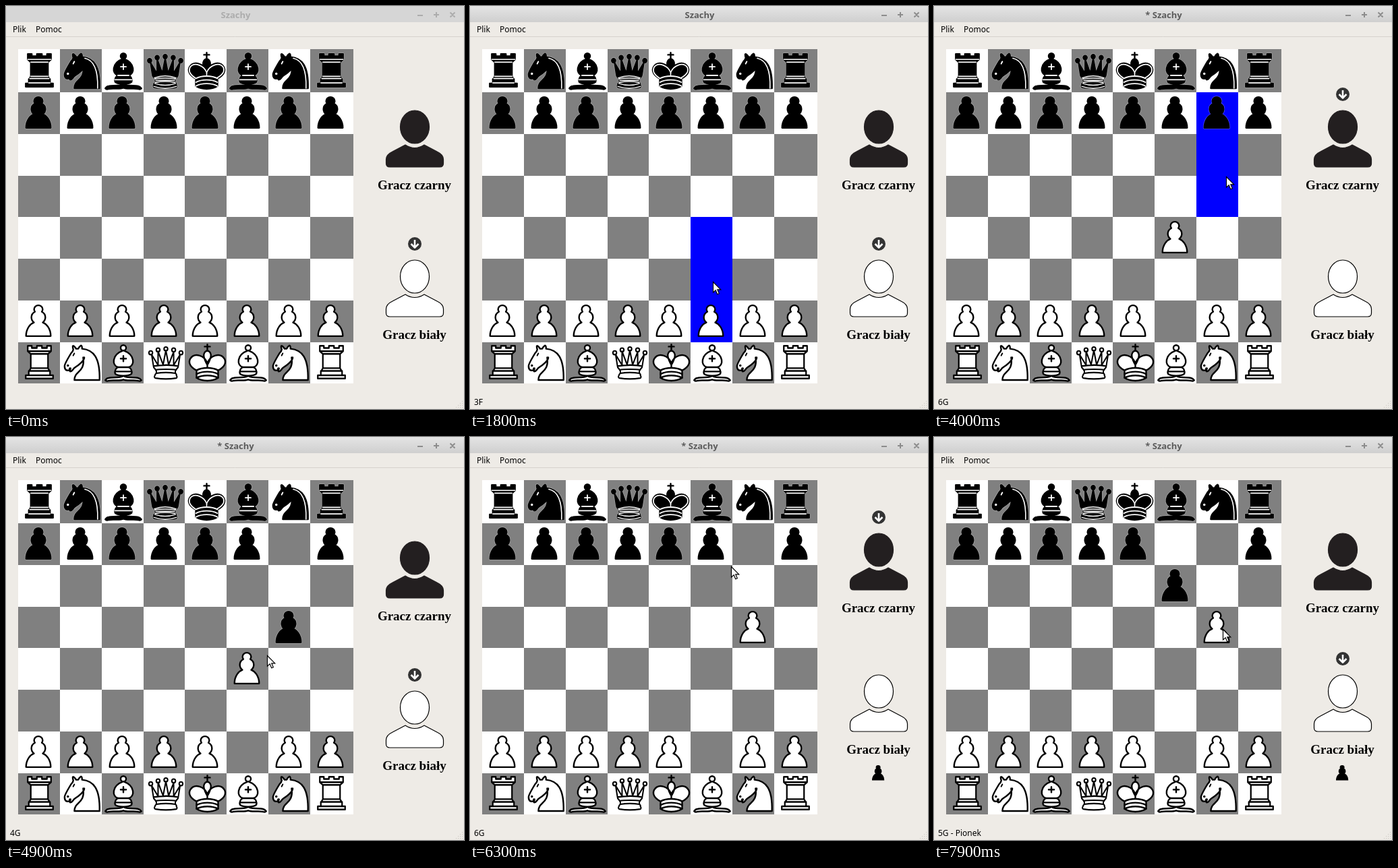
An HTML page with a canvas for the animation above (8000 ms loop, 679 px wide and 598 px high).

```html
<!DOCTYPE html>
<html lang="pl">
<head>
<meta charset="utf-8">
<title>Szachy</title>
<style>
  html, body { margin: 0; width: 100%; height: 100%; overflow: hidden; background: #eeebe6; }
  canvas { display: block; }
</style>
</head>
<body>
<canvas id="stage" width="679" height="598"></canvas>
<script>
const ctx = document.getElementById('stage').getContext('2d');
const LOOP = 8000, STEP = 100;
const SANS = '"Noto Sans", "Open Sans", sans-serif';
const SERIF = '"Liberation Serif", "Times New Roman", serif';
const COLS = [18, 80, 142, 204, 265, 327, 389, 451, 515];
const ROWS = [64, 128, 190, 252, 313, 375, 437, 499, 560];
const NAMES = { P: 'Pionek', R: 'Wieża', N: 'Skoczek', B: 'Goniec', Q: 'Hetman', K: 'Król' };

const MOVES = [[2400, 'F2', 'F4'], [4400, 'G7', 'G5'], [6000, 'F4', 'G5'], [7400, 'F7', 'F6']];
const MARKS = [
  [1400, 2400, 'F2 F3 F4'], [3500, 4400, 'G7 G6 G5'],
  [5300, 6000, 'F4 F5 G5'], [6900, 7400, 'F7 F6 F5']
];
const FOCUS_AT = 1400, ENTER_AT = 300;

// Pointer keys: time, x, y
const POINTER = [
  [300, 338, 0], [700, 346, 220], [1000, 351, 430], [1100, 352, 452], [1400, 357, 468],
  [1600, 358, 458], [1800, 360, 409], [2000, 359, 345], [2100, 360, 347], [2400, 360, 347],
  [2900, 427, 209], [3200, 428, 156], [3300, 430, 156], [3600, 430, 160], [4000, 433, 253],
  [4300, 431, 283], [4400, 430, 285], [4900, 387, 324], [5200, 358, 345], [5300, 358, 344],
  [5800, 420, 283], [6000, 420, 283], [6300, 387, 192], [6800, 356, 156], [6900, 356, 157],
  [7300, 357, 216], [7400, 358, 219], [7700, 404, 259], [7800, 418, 274], [7900, 428, 285]
];

const ball = (x, y, r) => `M${x - r} ${y}a${r} ${r} 0 1 0 ${2 * r} 0a${r} ${r} 0 1 0 ${-2 * r} 0z`;
const crown = r => [[6, 12], [14, 9], [22.5, 8], [31, 9], [39, 12]].map(p => ball(...p, r)).join('');

// Shapes on a 45 unit grid. fit: centre x, top y, scale x, scale y
const PIECES = {
  P: {
    fit: [30, -6.4, 1.59, 1.5],
    body: 'M22.5 9c-2.2 0-4 1.8-4 4 0 .9.3 1.7.8 2.4C17.3 16.5 16 18.6 16 21c0 2 .9 3.8 2.4 5C15.4 27 11 31.6 11 39.5H34c0-7.9-4.4-12.4-7.4-13.5C28 24.8 29 23 29 21c0-2.4-1.3-4.5-3.3-5.6.5-.7.8-1.5.8-2.4 0-2.2-1.8-4-4-4z'
  },
  R: {
    fit: [31.5, -9.4, 1.5, 1.62],
    body: 'M9 39h27v-3H9zM12 36v-4h21v4zM12.5 32l1.5-2.5h17l1.5 2.5zM14 29.5v-13h17v13zM14 16.5L11 14h23l-3 2.5zM11 14V9h4v2h5V9h5v2h5V9h4v5z',
    light: 'M12 35.5h21M13 31.5h19M14 29.5h17M14 16.5h17M11 14h23', thin: 1
  },
  N: {
    fit: [33.6, -6.4, 1.62, 1.6],
    body: 'M22 10c10.5 1 16.5 8 16 29H15c0-9 10-6.5 8-21M24 18c.4 2.9-5.5 7.4-8 9-3 2-2.8 4.3-5 4-1-.9 1.4-3 0-3-1 0 .2 1.2-1 2-1 0-4 1-4-4 0-2 6-12 6-12s1.9-1.9 2-3.5c-.7-1-.5-2-.5-3 1-1 3 2.5 3 2.5h2s.8-2 2.5-3c1 0 1 3 1 3',
    dots: ball(9, 25.5, .5) + 'M14.9 14.3l-1 2',
    light: 'M24.5 11.2c7.5 1.6 12.3 8.8 11.7 27.8', thin: 1
  },
  B: {
    fit: [32, -4.6, 1.62, 1.6],
    body: 'M9 36c3.4-1 10.1.4 13.5-2 3.4 2.4 10.1 1 13.5 2 0 0 1.7.5 3 2-.7 1-1.7 1-3 .5-3.4-1-10.1.5-13.5-1-3.4 1.5-10.1 0-13.5 1-1.3.5-2.3.5-3-.5 1.3-1.9 3-2 3-2zM15 32c2.5 2.5 12.5 2.5 15 0 .5-1.5 0-2 0-2 0-2.5-2.5-4-2.5-4 5.5-1.5 6-11.5-5-15.5-11 4-10.5 14-5 15.5 0 0-2.5 1.5-2.5 4 0 0-.5.5 0 2z' + ball(22.5, 8, 2.5),
    lines: 'M17.5 26h10M15 30h15M22.5 15.5v5M20 18h5'
  },
  Q: {
    fit: [33, -1.5, 1.36, 1.42], darkFit: [32, -2.9, 1.4, 1.5],
    body: 'M9 26c8.5-1.5 21-1.5 27 0l2-12-7 11V11l-5.5 13.5-3-15-3 15-5.5-14V25L7 14zM9 26c0 2 1.5 2 2.5 4 1 1.5 1 1 .5 3.5-1.5 1-1.5 2.5-1.5 2.5-1.5 1.5.5 2.5.5 2.5 6.5 1 16.5 1 23 0 0 0 1.5-1 0-2.5 0 0 .5-1.5-1-2.5-.5-2.5-.5-2 .5-3.5 1-2 2.5-2 2.5-4-8.5-1.5-18.5-1.5-27 0z' + crown(2),
    lines: 'M11.5 30c3.5-1 18.5-1 22 0M12 33.5c6-1 15-1 21 0',
    light: 'M11 29q11.5-3.8 23 0M12.5 31.5h20M11.5 34.5q11 3.6 22 0M10.5 37.5q12 3.8 24 0', thin: 1
  },
  K: {
    fit: [33.5, -6.4, 1.6, 1.6], darkFit: [32.5, -6.4, 1.6, 1.6],
    body: 'M22.5 25s4.5-7.5 3-10.5c0 0-1-2.5-3-2.5s-3 2.5-3 2.5c-1.5 3 3 10.5 3 10.5M12.5 37c5.5 3.5 14.5 3.5 20 0v-7s9-4 6-10.5c-4-6.5-13.5-3.5-16 4V27v-3.5c-2.5-7.5-12-10.5-16-4-3 6.5 6 10.5 6 10.5z',
    cross: 'M22.5 11.6V6M20 8h5',
    lines: 'M12.5 30c5.5-3 14.5-3 20 0M12.5 33.5c5.5-3 14.5-3 20 0M12.5 37c5.5-3 14.5-3 20 0',
    light: 'M32 29.5s8.5-4 6-9.7C34 14 25 18 22.5 24.5v2-2C20 18 11 14 7 19.8c-2.5 5.7 5 9.7 5 9.7', thin: 1.1
  }
};
for (const p of Object.values(PIECES))
  for (const k of ['body', 'lines', 'light', 'dots', 'cross']) if (p[k]) p[k] = new Path2D(p[k]);

function drawPiece(code, x, y, size = 1) {
  const dark = code[0] === 'b', p = PIECES[code[1]];
  const [cx, top, sx, sy] = dark && p.darkFit || p.fit;
  const stroke = (path, color, width) => {
    if (!path) return;
    ctx.strokeStyle = color;
    ctx.lineWidth = width;
    ctx.stroke(path);
  };
  ctx.save();
  ctx.translate(x, y + (dark && code[1] !== 'P' ? 2 : 0));
  ctx.scale(size, size);
  ctx.translate(cx, top);
  ctx.scale(sx, sy);
  ctx.translate(-22.5, 0);
  ctx.lineJoin = ctx.lineCap = 'round';
  if (dark && size === 1) stroke(p.body, 'rgba(255,255,255,.3)', 2.4);
  stroke(p.cross, '#000', 1.5);
  ctx.fillStyle = dark ? '#000' : '#fff';
  ctx.fill(p.body);
  stroke(p.body, '#000', 1.5);
  stroke(p.lines, dark ? '#fff' : '#000', dark ? 1.1 : 1.5);
  stroke(p.dots, dark ? '#fff' : '#000', 1.2);
  if (dark) stroke(p.light, '#fff', p.thin);
  ctx.restore();
}

function text(str, x, y, font, color, align = 'left') {
  ctx.font = font;
  ctx.fillStyle = color;
  ctx.textAlign = align;
  ctx.fillText(str, x, y);
}

function line(color, width, ...segments) {
  ctx.strokeStyle = color;
  ctx.lineWidth = width;
  ctx.lineCap = 'butt';
  ctx.beginPath();
  for (const [x1, y1, x2, y2] of segments) { ctx.moveTo(x1, y1); ctx.lineTo(x2, y2); }
  ctx.stroke();
}

function position(t) {
  const board = {};
  [...'ABCDEFGH'].forEach((f, i) => {
    const back = 'RNBQKBNR'[i];
    Object.assign(board, { [f + 8]: 'b' + back, [f + 7]: 'bP', [f + 2]: 'wP', [f + 1]: 'w' + back });
  });
  const done = MOVES.filter(m => t >= m[0]);
  for (const [, from, to] of done) {
    board[to] = board[from];
    delete board[from];
  }
  return { board, count: done.length };
}

function pointerAt(t) {
  let i = POINTER.findIndex(k => k[0] > t);
  if (i < 0) return POINTER[POINTER.length - 1].slice(1);
  const [t0, x0, y0] = POINTER[i - 1], [t1, x1, y1] = POINTER[i];
  const u = (t - t0) / (t1 - t0);
  return [Math.round(x0 + (x1 - x0) * u), Math.round(y0 + (y1 - y0) * u)];
}

function statusAt(x, y, board) {
  const cell = (edges, v) => edges.findIndex((e, i) => v >= e && v < edges[i + 1]);
  const c = cell(COLS, x + 2), r = cell(ROWS, y - 2);
  if (c < 0 || r < 0) return '';
  const file = 'ABCDEFGH'[c], rank = 8 - r, piece = board[file + rank];
  return rank + file + (piece ? ' - ' + NAMES[piece[1]] : '');
}

function drawWindow(focused, title) {
  ctx.fillStyle = '#eeebe6';
  ctx.fillRect(0, 0, 679, 598);
  if (focused) {
    const g = ctx.createLinearGradient(0, 0, 0, 24);
    g.addColorStop(0, '#e4e4e4');
    g.addColorStop(1, '#cfcfcf');
    ctx.fillStyle = g;
  } else ctx.fillStyle = '#d6d6d6';
  ctx.beginPath();
  ctx.roundRect(0, 0, 679, 24, [3, 3, 0, 0]);
  ctx.fill();
  text(title, 340.5, 18, `bold 13px ${SANS}`, focused ? '#5c5c5c' : '#acacac', 'center');
  line(focused ? '#8c8c8c' : '#acacac', 2,
    [610, 14, 618, 14], [634, 13, 642, 13], [638, 9, 638, 17],
    [658.5, 9.5, 665.5, 16.5], [665.5, 9.5, 658.5, 16.5]);
  text('Plik', 10, 39, `12px ${SANS}`, '#000');
  text('Pomoc', 44, 39, `12px ${SANS}`, '#000');
  line('#d6d2cd', 1, [0, 45.5, 679, 45.5]);
  ctx.fillStyle = '#c4c0ba';
  for (let r = 0; r < 4; r++)
    for (let c = 0; c <= r; c++) ctx.fillRect(676 - c * 3, 586 + r * 3, 1, 1);
}

function drawBoard(board, marked) {
  for (let r = 0; r < 8; r++) for (let c = 0; c < 8; c++) {
    const x = COLS[c], y = ROWS[r];
    ctx.fillStyle = marked.includes('ABCDEFGH'[c] + (8 - r)) ? '#0000ff' : (r + c) % 2 ? '#808080' : '#fff';
    ctx.fillRect(x, y, COLS[c + 1] - x, ROWS[r + 1] - y);
  }
  for (const [cell, code] of Object.entries(board))
    drawPiece(code, COLS[cell.charCodeAt(0) - 65], ROWS[8 - cell[1]]);
}

function drawPlayer(y, dark, name, active) {
  ctx.save();
  ctx.translate(606, y);
  ctx.fillStyle = dark ? '#231f20' : '#fff';
  ctx.strokeStyle = dark ? '#231f20' : '#000';
  ctx.lineWidth = 1.2;
  ctx.lineJoin = 'round';
  const paint = path => { ctx.fill(path); ctx.stroke(path); };
  const head = new Path2D();
  head.ellipse(0, 0, 21.5, 24.5, 0, 0, Math.PI * 2);
  paint(head);
  paint(new Path2D('M-14 26.5Q-7 31 0 31T14 26.5L33 36.5Q42.5 41 42.5 48V54Q42.5 59.5 37 59.5H-37Q-42.5 59.5-42.5 54V48Q-42.5 41-33 36.5z'));
  if (active) {
    ctx.fillStyle = '#333';
    ctx.beginPath();
    ctx.arc(0, -48.5, 10, 0, Math.PI * 2);
    ctx.fill();
    line('#fff', 2.6, [0, -54.5, 0, -44]);
    ctx.lineWidth = 2.6;
    ctx.stroke(new Path2D('M-5.5-48.5L0-43L5.5-48.5'));
  }
  ctx.restore();
  text(name, 605.5, y + 92.5, `bold 19px ${SERIF}`, '#000', 'center');
}

function drawPointer(x, y) {
  ctx.save();
  ctx.translate(x + .5, y + .5);
  const arrow = new Path2D('M0 0V15.5L3.7 12.2L6.2 18.2L8.8 17.1L6.3 11.3H11.2z');
  ctx.fillStyle = '#fff';
  ctx.strokeStyle = '#000';
  ctx.lineWidth = 1.2;
  ctx.lineJoin = 'miter';
  ctx.fill(arrow);
  ctx.stroke(arrow);
  ctx.restore();
}

function draw(t) {
  const { board, count } = position(t);
  const mark = MARKS.find(m => t >= m[0] && t < m[1]);
  const captured = count >= 3;
  drawWindow(t >= FOCUS_AT, count ? '* Szachy' : 'Szachy');
  drawBoard(board, mark ? mark[2] : '');
  drawPlayer(captured ? 167.5 : 179.5, true, 'Gracz czarny', count % 2 === 1);
  drawPlayer(captured ? 377.5 : 401.5, false, 'Gracz biały', count % 2 === 0);
  if (captured) drawPiece('bP', 591, 484.2, .47);
  if (t >= ENTER_AT) {
    const [x, y] = pointerAt(t);
    text(statusAt(x, y, board), 6, 592, `12px ${SANS}`, '#000');
    drawPointer(x, y);
  }
}

const start = performance.now();
function frame() {
  const t = (performance.now() - start) % LOOP;
  draw(Math.floor(t / STEP) * STEP);
  requestAnimationFrame(frame);
}
frame();
</script>
</body>
</html>
```
